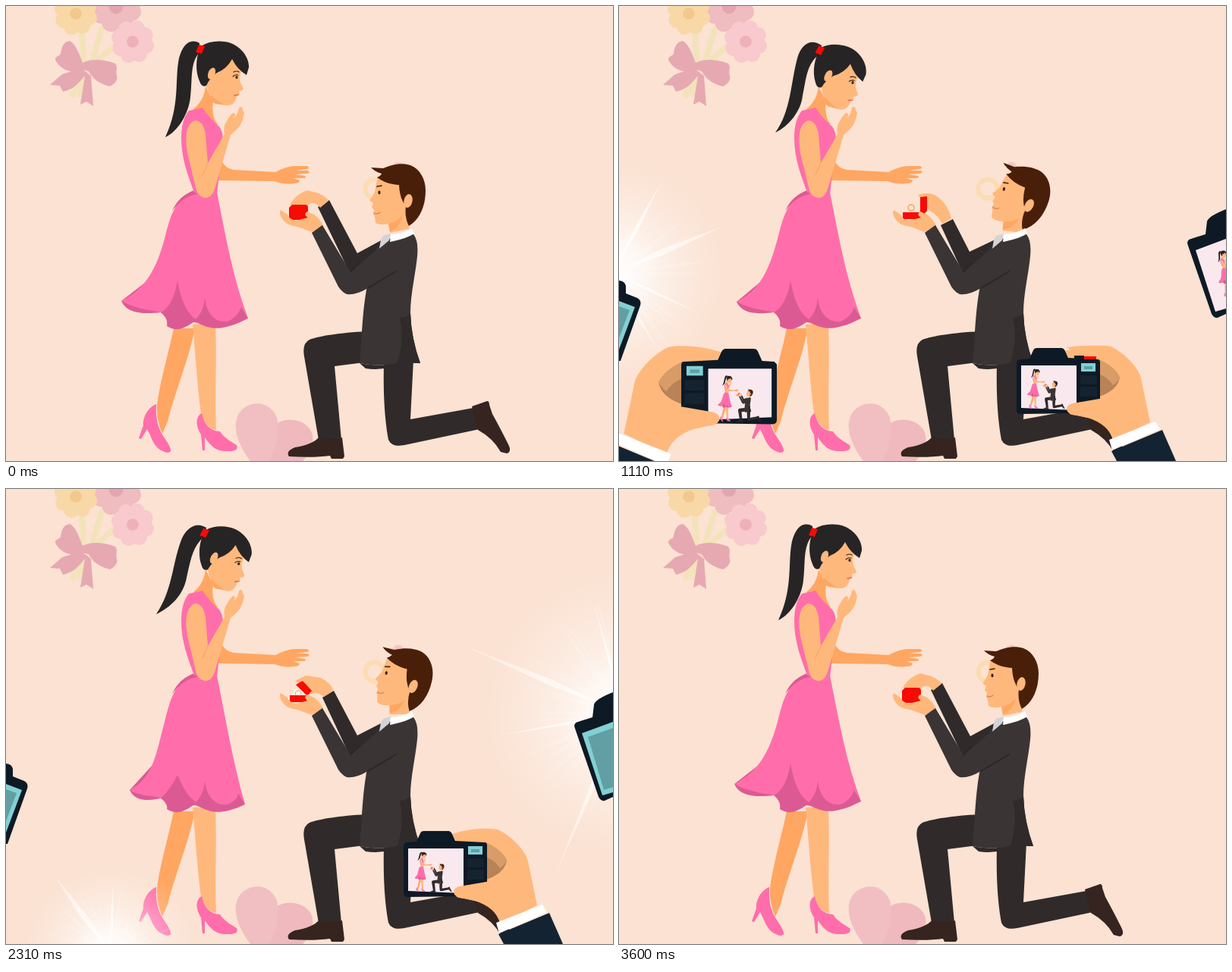
Write an HTML page that moves like this. It is 800x600 px and loops after 3.63 s.

```html
<!DOCTYPE html>
<html lang="en">
<head>
<meta charset="utf-8">
<title>Proposal</title>
<style>
html, body { margin: 0; width: 100%; height: 100%; overflow: hidden; background: #fbe2d2; }
svg { display: block; width: 800px; height: 600px; }
.skin { fill: #ffb87c; } .shade { fill: #ffa662; }
.pink { fill: #ff6eaa; } .rose { fill: #dc5a94; }
.hair { fill: #272425; } .brown { fill: #4a1f0a; }
.suit { fill: #3a3434; } .dark { fill: #302a2a; } .boot { fill: #35241f; }
.red { fill: #f80a05; } .body { fill: #0d1a25; } .photo { fill: #f9e9ee; }
.teal { fill: #83d0d4; } .deep { fill: #619fa5; }
.bow { fill: #e6a9b2; } .line { fill: none; stroke-linecap: round; }
</style>
</head>
<body>
<svg viewBox="0 0 800 600">
<rect width="800" height="600" fill="#fbe2d2"/>

<g id="bouquet">
  <path class="line" stroke="#f3e3ba" stroke-width="8" d="M100 35L103 80M126 30L110 85M146 50L113 78M100 85L88 117M104 92L98 116"/>
  <g id="flowers"></g>
  <path class="bow" d="M99 82L74 90L58 104L71 105L75 113C90 110 97 100 104 92L98 130L106 126L115 132L112 92Z"/>
  <path class="bow" d="M101 84C88 90 72 85 65 71C64 67 70 66 72 63C73 54 76 47 84 46C92 50 97 64 101 75C112 68 133 71 144 76C148 81 144 86 146 92C148 98 142 104 137 106C124 103 114 96 109 86Z"/>
</g>
<g id="heart">
  <path fill="#f1bfc1" d="M322 600C309 582 299 562 304 544C310 524 336 518 350 532Q358 540 358 550C374 541 397 547 403 563C408 580 397 594 391 600Z"/>
  <path fill="#efb9bd" d="M358 550C374 541 397 547 403 563C408 580 397 594 391 600H347Q361 575 358 550Z"/>
</g>
<circle cx="486" cy="241" r="12.5" fill="none" stroke="#fbdcb3" stroke-width="6"/>
<path fill="#f4c5c5" d="M509 211L514 206H520L525 211L517 218Z"/>

<g id="couple">
<g id="woman">
  <path class="shade" d="M221 425C213 463 203 495 199 526Q198 545 206 564L213 548C222 510 240 470 249 425Z"/>
  <path class="skin" d="M246 420C250 463 252 500 257 538Q265 558 277 559C275 520 278 470 276 418Z"/>
  <path class="pink" d="M198 525C187 529 180 543 181 553L175 570L178 571L186 558C192 568 194 582 207 587C214 591 218 588 217 585C215 576 205 566 202 557Q197 545 198 525Z"/>
  <path class="pink" d="M258 537C249 541 250 555 257 565L259 586H262L262 569C270 580 276 587 290 587C300 587 307 586 304 579C296 574 288 570 282 561C270 561 261 552 258 537Z"/>
  <path class="shade" d="M283 202Q288 214 300 216L355 219Q372 210 384 211L397 211Q402 214 396 215L382 217L398 217Q402 220 396 221L381 222L394 224Q397 227 391 227L379 227L387 230Q387 234 379 234Q366 236 354 231L279 230Z"/>
  <g id="skirts"></g>
  <path class="shade" d="M263 106Q261 125 247 136L260 158L279 156Q270 145 273 126Z"/>
  <path class="pink" d="M241 138L259 134Q268 148 281 159Q286 165 286 178L278 248L248 246C240 223 231 202 231 174Q231 150 241 138Z"/>
  <g id="tails" class="hair">
    <path data-p="0" d="M255 49C242 42 233 51 228 69C222 98 230 130 210 173C226 166 241 142 243 120C246 97 242 76 255 61Z"/>
    <path data-p="1" d="M264 51C251 43 237 50 230 70C219 101 219 134 198 165C216 157 234 140 238 117C243 96 245 76 262 62Z"/>
    <path data-p="2" d="M267 52C253 42 240 50 235 69C226 102 227 137 206 167C223 159 240 139 242 118C247 95 247 76 265 63Z"/>
  </g>
  <g id="girlHead">
    <path class="skin" d="M262 82L300 66L310 86Q307 94 309 101L313 109Q312 112 307 112L308 117L304 119L303 123Q299 132 291 131Q280 128 272 121Q262 112 262 82Z"/>
    <path class="shade" d="M270 117Q280 127 291 131L276 129L268 124Z"/>
    <path class="hair" d="M257 53Q270 45 288 47C306 49 321 66 320 81L317 91Q305 84 298 70Q291 83 278 88Q269 94 264 105Q258 108 255 99C249 85 250 67 257 53Z"/>
    <ellipse class="skin" cx="271" cy="89" rx="4.5" ry="8" transform="rotate(22 271 89)"/>
    <path class="line" stroke="#272425" stroke-width="1.2" d="M300 87Q304 85 307 87"/>
    <ellipse cx="304" cy="94" rx="1.6" ry="2" fill="#372620"/>
    <path class="line" stroke="#372620" stroke-width="1.1" d="M299 93Q302 90 306 91"/>
    <path class="line" stroke="#e5654f" stroke-width="1.4" d="M301 118L306 117"/>
    <path class="red" d="M254 51L262 53L258 63L250 61Z"/>
  </g>
  <path class="skin" d="M249 151Q260 151 263 169L266 207L288 169Q286 158 291 152Q296 142 300 141Q304 142 300 149Q306 142 307 134Q312 131 312 138Q315 140 313 145Q312 158 296 170L276 238Q272 253 263 253Q254 252 251 243L239 194Q233 157 249 151Z"/>
  <path class="line" stroke="#f4a263" stroke-width="1" d="M266 207L259 223"/>
</g>

<g id="man">
  <path class="dark" d="M498 472C497 512 499 545 504 572Q508 582 525 579L624 558L616 530L533 545L537 466Z"/>
  <path class="boot" d="M614 528L634 521Q637 521 637 526L641 538Q651 556 662 578Q667 588 660 590L652 588Q642 570 622 559Z"/>
  <path class="dark" d="M475 429C440 431 413 435 400 440Q390 445 393 462L412 572H442L433 475L472 470Z"/>
  <path class="boot" d="M413 568Q427 574 443 569L446 594L444 597H429L427 593Q406 596 373 594Q368 587 381 582Q405 578 413 568Z"/>

  <g data-p="0">
    <path class="dark" d="M411 265L426 256L463 326L500 306L492 340L453 352Z"/>
    <path class="skin" d="M374 262Q382 248 397 243L412 247Q424 253 425 257L414 266Q408 257 400 261L394 268Z"/>
    <path class="red" d="M377 262H394Q398 262 398 266V278Q396 282 392 282H377Q373 282 373 278V266Z"/>
  </g>
  <g data-p="1">
    <path class="dark" d="M417 275L432 266L463 325L500 306L492 340L453 352Z"/>
    <path class="skin" d="M381 253L395 246L415 249Q430 257 431 266L419 274Q410 266 400 271Z"/>
    <path fill="#fff1e8" d="M382 262L396 269L394 275H375Z"/>
    <path class="red" d="M374 272H398L396 281H374ZM382 258L391 253L403 266L397 273Z"/>
    <path class="line" stroke="#e8a559" d="M382 272A4 4 0 1 1 389 271"/>
  </g>
  <g data-p="2">
    <path class="dark" d="M424 289L440 281L462 324L500 306L492 340L453 352Z"/>
    <path class="skin" d="M394 249Q406 245 416 249Q433 259 438 280L426 287Q420 275 408 269Z"/>
    <path class="red" d="M374 272H397V252L406 251V270L396 281H374Z"/>
    <circle class="line" stroke="#e8a559" stroke-width="1.4" cx="385" cy="266" r="4"/>
  </g>
  <path class="skin" d="M362 269Q359 274 365 282Q371 290 384 291L403 298L418 290Q415 282 406 275L397 271Q391 275 398 279L382 283Q373 281 371 275Z"/>

  <path class="suit" d="M499 308L537 301Q544 310 542 330C540 352 533 380 533 405Q534 438 546 471L516 470Q500 477 466 471C469 440 469 409 475 374L488 320Z"/>
  <path class="dark" d="M533 405Q534 438 546 471L516 470Q526 438 519 411Q528 411 533 405ZM466 471Q500 477 516 470L512 475Q493 481 474 478Z"/>
  <path class="suit" d="M403 299L417 289L454 351L497 314Q523 309 531 330Q529 344 514 350L477 372Q460 382 449 380Q440 376 435 364Z"/>
  <path class="line" stroke="#2b2626" stroke-width="1.5" d="M454 351L466 338M477 372L514 350"/>
  <path fill="#d3d3d8" d="M497 303L507 300L505 309L492 320L494 308Z"/>
  <g id="boyHead">
    <path class="skin" d="M490 225L528 230L533 260L531 294L506 299L504 287Q493 290 487 286L486 278L484 274L485 269L482 265L484 260L479 256Q487 247 487 239Z"/>
    <path class="shade" d="M504 287Q515 285 523 276Q519 293 506 297Z"/>
    <path class="brown" d="M481 213L497 214C511 208 523 207 533 210C546 215 553 229 553 243C553 263 546 281 531 290Q525 279 527 264Q519 255 518 236Q501 235 489 226Q494 224 495 221Q487 219 481 213Z"/>
    <ellipse class="skin" cx="530" cy="257" rx="5.5" ry="9" transform="rotate(12 530 257)"/>
    <path class="line" stroke="#4a1f0a" stroke-width="1.6" d="M489 238L495 237"/>
    <ellipse cx="492" cy="246" rx="1.6" ry="2.4" fill="#3a2118"/>
    <path class="line" stroke="#d88350" stroke-width="1.2" d="M485 273Q490 275 493 272"/>
  </g>
  <path fill="#fff" d="M507 301Q522 301 535 293L538 300Q528 307 506 311Z"/>
</g>
</g>

<g data-p="1" id="flashH"></g>
<g data-p="2" id="flashO"></g>

<g data-p="12">
  <path class="body" d="M0 362Q8 363 9 369V379L24 385Q30 388 28 395L2 468H0Z"/>
  <path class="teal" d="M0 389L21 397L0 453Z"/>
  <path class="deep" d="M0 396L14 401L0 438Z"/>
  <path class="body" d="M750 316Q747 309 754 307L773 301L775 284Q777 277 800 268V406L789 411Q784 412 781 406Z"/>
  <g data-p="1">
    <path class="teal" d="M759 322L800 307V400L786 404Z"/>
    <path class="deep" d="M767 327L800 315V393L788 397Z"/>
  </g>
  <g data-p="2">
    <path class="photo" d="M760 322L800 307V399L786 403Z"/>
    <use href="#woman" transform="translate(796 326) rotate(-14) scale(.115) translate(-285 -80)"/>
  </g>
  <g id="cam">
    <path class="skin" d="M588 455Q620 445 648 449C666 457 685 477 688 491L700 549L651 573Q646 552 618 543L594 538V466Z"/>
    <path fill="#b98257" d="M632 466Q654 476 660 490Q657 507 633 515Z"/>
    <path fill="#d89c68" d="M632 466Q654 476 660 490Q656 497 651 500Q645 490 632 485Z"/>
    <path class="body" d="M527 466L541 465L546 454Q547 451 551 451H583Q586 451 588 455L592 464L631 466Q634 466 634 470V517Q634 521 630 521L605 523V537L529 538Q524 538 524 533V469Z"/>
    <path class="photo" d="M530 474H603V533L530 530Z"/>
    <path class="teal" d="M609 471H628V482H609Z"/>
    <path class="deep" d="M613 475H624V479H613Z"/>
    <path fill="#14232f" d="M608 487H630V499H608ZM608 502H630V515H608Z"/>
    <path class="skin" d="M604 523Q590 524 590 532Q591 539 604 540L640 548L660 520L633 518Z"/>
    <path fill="#fff" d="M646 572L707 548L713 558L650 586Z"/>
    <path fill="#142331" d="M649 587L716 559L734 600H656Z"/>
  </g>
  <path data-p="2" class="skin" d="M590 450Q620 446 648 449L660 462L610 462Z"/>
  <path data-p="2" class="red" d="M613 462H629V466H613Z"/>
  <path data-p="2" class="body" d="M600 461H613V466H600Z"/>
  <use href="#couple" transform="translate(523 474) scale(.097)"/>
</g>
<g data-p="2">
  <use href="#cam" transform="translate(808 -64.5) scale(-1.145 1.145)"/>
  <use href="#couple" transform="translate(113 482) scale(.112)"/>
</g>
</svg>
<script>
const $ = id => document.getElementById(id);
const LOOP = 3630, HOLD = 450, ORDER = [0, 1, 2, 1];

function flower(x, y, r, petal, core) {
  let s = '';
  for (let i = 0; i < 8; i++) {
    const a = i * Math.PI / 4 + .3;
    s += `<circle cx="${x + r * .66 * Math.cos(a)}" cy="${y + r * .66 * Math.sin(a)}" r="${r * .37}" fill="${petal}"/>`;
  }
  return s + `<circle cx="${x}" cy="${y}" r="${r * .72}" fill="${petal}"/><circle cx="${x}" cy="${y}" r="${r * .28}" fill="${core}"/>`;
}

// (x, y): left hem tip, (rx, ry): right hem tip, d: drop of the first fold
function skirt(p, x, y, rx, ry, d) {
  const top = 362 + d, mid = 404 + d / 4;
  const hem = `M${x} ${y}C${x + 8} ${y + 18} ${x + 32} ${mid + 2} 204 ${mid}Q214 ${mid + 8} 212 422C226 431 236 424 247 417C262 418 270 437 ${rx} ${ry}`;
  return `<g data-p="${p}">
    <path class="rose" d="${hem}L300 370L215 340Z"/>
    <path class="pink" d="M248 245C222 254 216 279 209 307C198 347 ${x + 32} ${y - 16} ${x} ${y}C${x + 18} ${y + 10} ${x + 34} ${mid - 4} 204 ${mid}C215 398 222 385 226 ${top}C231 388 237 403 250 413C257 406 261 398 262 384C264 408 278 418 292 416Q306 410 ${rx - 9} ${ry - 15}L${rx} ${ry}C298 356 289 300 278 246Z"/>
    <path class="rose" d="M248 243C233 249 225 257 219 270C230 256 240 250 252 248Z"/>
  </g>`;
}

function rng(seed) {
  return () => (seed = seed * 16807 % 2147483647) / 2147483647;
}

// rays: [angle in degrees, length, half width]
function flash(id, x, y, r, rays) {
  const rnd = rng(r * 97), g = 'glow' + id;
  const ray = (deg, len, w, o) => {
    const a = deg * Math.PI / 180, c = Math.cos(a), s = Math.sin(a);
    const m = len * .45, mx = x + m * c, my = y + m * s;
    return `<path fill="url(#${g}r)" opacity="${o}" d="M${x} ${y}L${mx - w * s} ${my + w * c}L${x + len * c} ${y + len * s}L${mx + w * s} ${my - w * c}Z"/>`;
  };
  const grad = (name, size, stops) => `<radialGradient id="${name}" gradientUnits="userSpaceOnUse" cx="${x}" cy="${y}" r="${size}">` +
    stops.map(([at, o]) => `<stop offset="${at}" stop-color="#fff" stop-opacity="${o}"/>`).join('') + '</radialGradient>';
  let s = grad(g, r, [[0, 1], [.2, .8], [.45, .42], [.75, .14], [1, 0]]) + grad(g + 'r', r * 1.35, [[0, 1], [.5, .75], [1, .3]]);
  s += `<circle cx="${x}" cy="${y}" r="${r}" fill="url(#${g})"/>`;
  for (let i = 0; i < 44; i++) s += ray(i * 360 / 44 + rnd() * 6, r * (.5 + .45 * rnd()), 1 + 2 * rnd(), .18);
  return s + rays.map(([a, len, w]) => ray(a, len, w, .75)).join('');
}

$('flowers').innerHTML = flower(145, 1, 33, '#efbcc0', '#e3a5b0') + flower(92, 10, 28, '#f8d8a6', '#f3c88c') + flower(167, 47, 28, '#f8c9cd', '#eeb0b9');
$('skirts').innerHTML = skirt('0', 152, 389, 319, 412, 0) + skirt('1', 163, 397, 315, 416, 15) + skirt('2', 155, 390, 319, 412, 0);
$('flashH').innerHTML = flash('a', 814, 296, 195, [[203, 233, 4], [113, 232, 3], [255, 150, 2], [170, 165, 2]]) +
  flash('b', 138, 612, 120, [[234, 126, 4], [272, 90, 2]]);
$('flashO').innerHTML = flash('c', -8, 352, 155, [[-23, 158, 4], [-62, 135, 3], [25, 115, 2], [60, 115, 2]]);

const parts = [...document.querySelectorAll('[data-p]')];
const girlTilt = [0, 4.5, 7], boyTilt = [0, 10.4, 17];
let shown = -1;

function draw(t) {
  const pose = ORDER[Math.floor(t % LOOP / HOLD) % 4];
  if (pose === shown) return;
  shown = pose;
  for (const el of parts) el.style.display = el.dataset.p.includes(pose) ? '' : 'none';
  $('girlHead').setAttribute('transform', `rotate(${girlTilt[pose]} 248 130)`);
  $('boyHead').setAttribute('transform', `rotate(${boyTilt[pose]} 515 295)`);
}

const start = performance.now();
function tick() {
  draw(performance.now() - start);
  requestAnimationFrame(tick);
}
tick();
</script>
</body>
</html>
```
